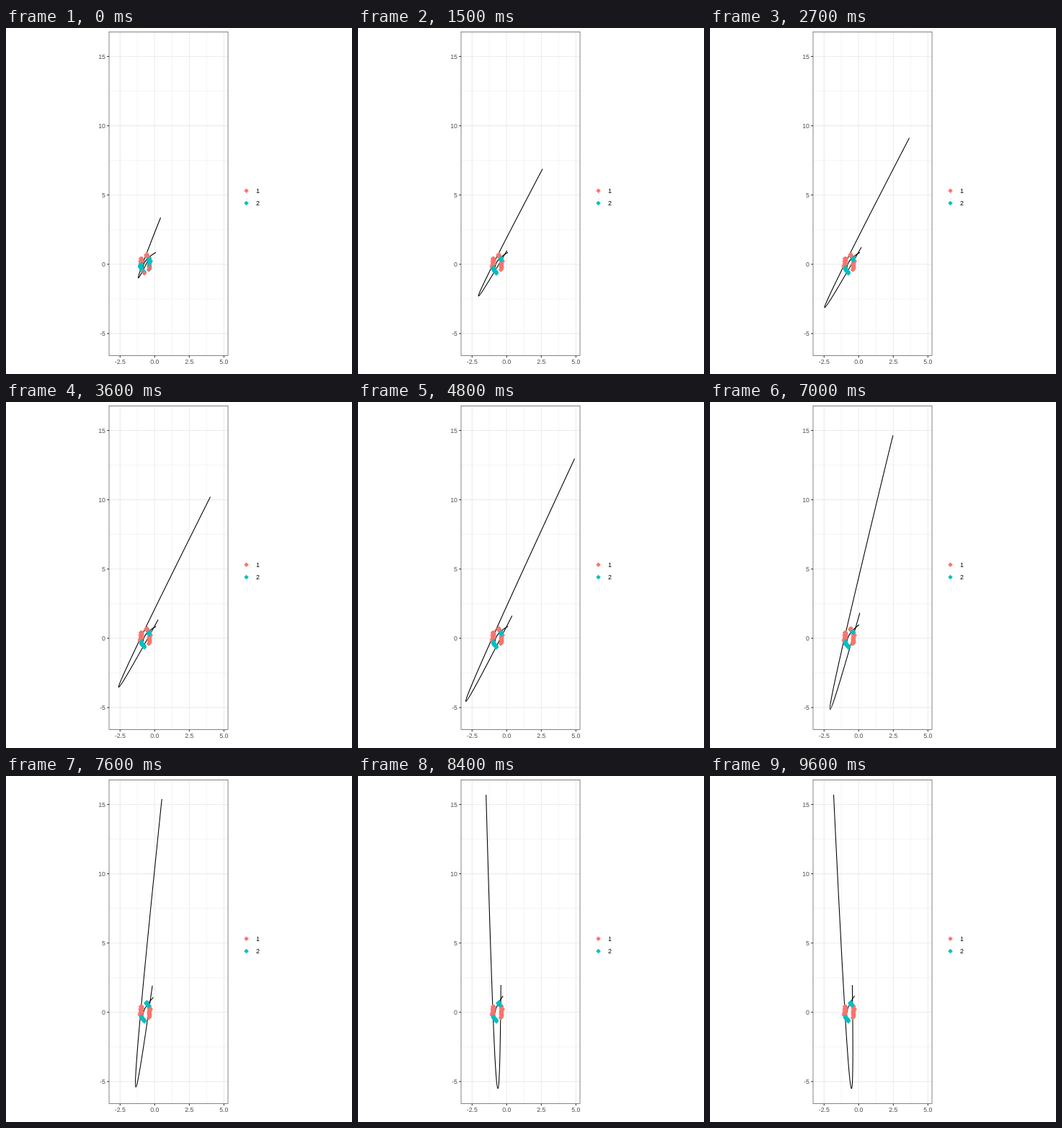
Recreate the animation shown at these times as an HTML page. Size 480x480 px, loop 10 s.

```html
<!DOCTYPE html>
<html>
<head>
<meta charset="utf-8">
<style>
  html, body { margin: 0; width: 100%; height: 100%; overflow: hidden; background: #fff; }
  svg { display: block; width: 100%; height: 100%; }
  text { font: 8.8px "Liberation Sans", Arial, sans-serif; }
</style>
</head>
<body>
<svg viewBox="0 0 480 480">
  <g id="grid"></g>
  <g fill="none" stroke="#000" stroke-width="1.07">
    <path id="long"/>
    <path id="short"/>
  </g>
  <g id="dots"></g>
  <rect x="143" y="5.6" width="165" height="448.9" fill="none" stroke="#333" stroke-width="0.6"/>
  <g id="axes"></g>
</svg>
<script>
const LOOP = 10000, RED = '#F8766D', TEAL = '#00BFC4';
const $ = id => document.getElementById(id);

function add(parent, tag, attrs, text) {
  const el = document.createElementNS('http://www.w3.org/2000/svg', tag);
  for (const k in attrs) el.setAttribute(k, attrs[k]);
  if (text !== undefined) el.textContent = text;
  parent.appendChild(el);
  return el;
}
const px = x => 206.3 + 19.2 * x;
const py = y => 327.8 - 19.22 * y;
const mix = (a, b, p) => a + (b - a) * p;
const diamond = (x, y, r = 3.3) => `M${x} ${y - r}L${x + r} ${y}L${x} ${y + r}L${x - r} ${y}Z`;
const line = (parent, d, stroke, width) => add(parent, 'path', { d, stroke, 'stroke-width': width });

function drawPlot() {
  const grid = $('grid'), axes = $('axes');
  const vert = (x, w) => line(grid, `M${px(x)} 5.6V454.5`, '#ebebeb', w);
  const horiz = (y, w) => line(grid, `M143 ${py(y)}H308`, '#ebebeb', w);
  for (let x = -1.25; x < 5; x += 2.5) vert(x, 0.53);
  for (let y = -2.5; y < 15; y += 5) horiz(y, 0.53);
  for (let x = -2.5; x <= 5; x += 2.5) {
    vert(x, 1.07);
    line(axes, `M${px(x)} 454.5v2.8`, '#333', 1.07);
    add(axes, 'text', { x: px(x), y: 466.1, fill: '#4d4d4d', 'text-anchor': 'middle' }, x.toFixed(1));
  }
  for (let y = -5; y <= 15; y += 5) {
    horiz(y, 1.07);
    line(axes, `M140.2 ${py(y)}H143`, '#333', 1.07);
    add(axes, 'text', { x: 138, y: py(y) + 3.1, fill: '#4d4d4d', 'text-anchor': 'end' }, y);
  }
  [RED, TEAL].forEach((fill, i) => {
    const y = 225.7 + 17.3 * i;
    add(axes, 'path', { d: diamond(333.5, y), fill });
    add(axes, 'text', { x: 347, y: y + 3.1, fill: '#000' }, i + 1);
  });
}

let seed = 7;
const rand = () => (seed = (seed * 16807) % 2147483647) / 2147483647;

// A ring of points: each stroke is repeated, turned half round the centre
const dots = [];
function stroke(n, x0, y0, x1, y1) {
  for (let i = 0; i < n; i++) {
    const jitter = () => (rand() * 2 - 1) * 1.1;
    const x = mix(x0, x1, i / (n - 1)), y = mix(y0, y1, i / (n - 1));
    for (const [cx, cy] of [[x, y], [386.6 - x, 654 - y]]) {
      const dot = { x: cx + jitter(), y: cy + jitter(), flip: rand() < 0.5 };
      dot.el = add($('dots'), 'path', { d: diamond(dot.x, dot.y) });
      dots.push(dot);
    }
  }
}

// Far end of the long curve after each early fit
const tips = [
  [214.5, 263], [234.5, 236.5], [256, 195.5], [271.5, 165.5], [276.5, 152.5],
  [282.5, 138.5], [283.5, 131.5], [291.5, 108.5], [300.5, 78.5], [298.5, 74.5]
];

function hold(t, early) {
  const step = t < 6000 ? early : t < 8800 ? 200 : 400;
  return Math.floor(t / step) * step;
}
function swing(t) {
  const p = Math.min(1, Math.max(0, (t - 5800) / 3000));
  return p * p * (3 - 2 * p);
}
// Control value that makes a quadratic from a to b turn at v
const control = (a, v, b) => v + Math.sign(v - a) * Math.sqrt((a - v) * (b - v));
const curve = (...p) => `M${p[0]} ${p[1]}Q${p[2]} ${p[3]} ${p[4]} ${p[5]}`;

function longCurve(t) {
  const [x, y] = tips[Math.min(tips.length - 1, Math.floor(t / 600))];
  const dx = x - tips[0][0], dy = tips[0][1] - y;
  const endX = 200 + 0.16 * dx, endY = 316 - 0.106 * dy;
  const midX = control(x, 183.5 - 0.395 * dx, endX);
  const midY = control(y, 346.8 + 0.372 * dy, endY);
  const k = swing(t), q = 1 - (1 - k) ** 2;
  return curve(x - 127 * k, y - 48.5 * q, midX + 149 * k, midY + 55 * q, endX - 16 * k, endY - 6 * q);
}
function shortCurve(t) {
  const k = swing(t);
  return curve(192, 341, 184, 325 + 5 * k, 208 - 7.5 * k ** 1.7, 311.3 - 6.5 * k);
}

function isTeal({ x, y, flip }, t) {
  if (t < 300) {
    const fromDiagonal = Math.abs(14 * (x - 186) + 15 * (y - 333)) / 20.5;
    return fromDiagonal < 3.5 || (y > 327 && flip);
  }
  const k = swing(t);
  const near = (cx, cy, r) => Math.hypot(x - cx, y - cy) < r;
  return near(mix(197.6, 195.5, k), mix(319.5, 315, k), mix(3.3, 3.8, k))
    || near(mix(189.5, 190.5, k), mix(336.3, 337.5, k), mix(5.6, 4.7, k));
}

function render(t) {
  const fit = hold(t, 600), label = hold(t, 300);
  $('long').setAttribute('d', longCurve(fit));
  $('short').setAttribute('d', shortCurve(fit));
  for (const dot of dots) dot.el.setAttribute('fill', isTeal(dot, label) ? TEAL : RED);
}

drawPlot();
stroke(18, 188, 319, 186.8, 332);
stroke(12, 187.4, 332.5, 192, 340);
const start = performance.now();
function tick() {
  render((performance.now() - start) % LOOP);
  requestAnimationFrame(tick);
}
tick();
</script>
</body>
</html>
```
